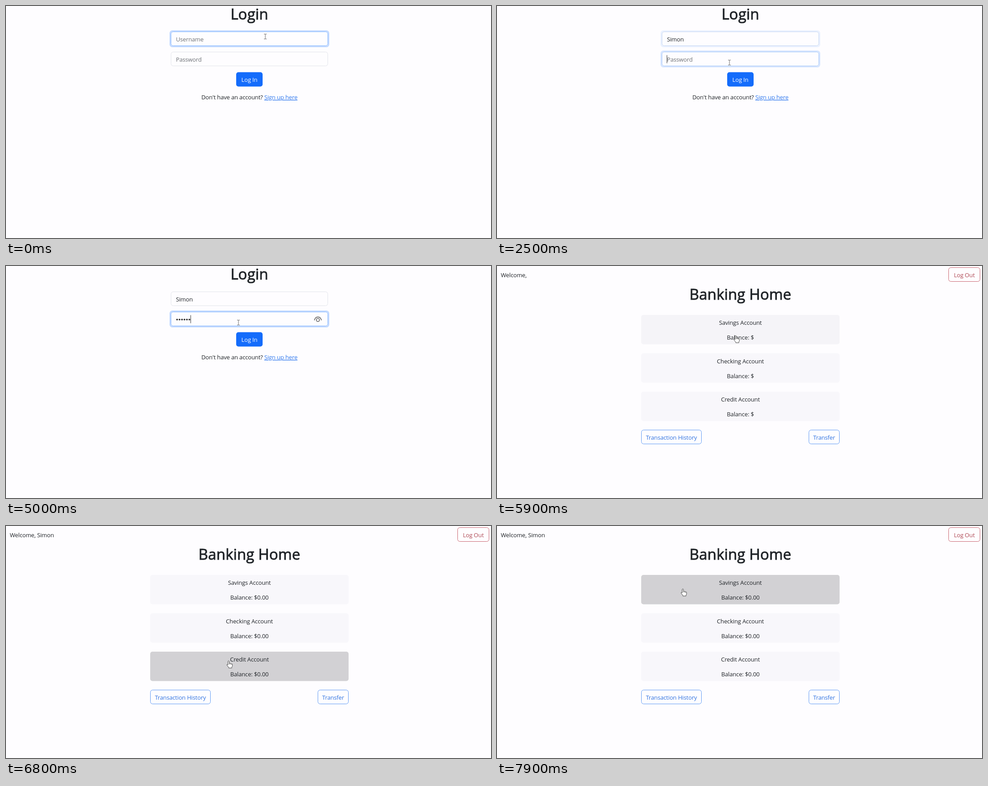
An HTML page for the animation above (8000 ms loop, 1083 by 517 pixels).

```html
<!DOCTYPE html>
<html lang="en">
<head>
<meta charset="utf-8">
<title>Banking login</title>
<style>
  html, body { margin: 0; width: 100%; height: 100%; overflow: hidden; background: #fefdff; }
  svg { display: block; width: 1083px; height: 517px; }
  text { font: 13px "Open Sans", "Noto Sans", sans-serif; letter-spacing: -.15px; fill: #212529; white-space: pre; }
  .title { font-size: 33px; letter-spacing: .1px; stroke: #212529; stroke-width: .9px; }
</style>
</head>
<body>
<svg id="stage" viewBox="0 0 1083 517"></svg>
<script>
const LOOP = 8000, STEP = 100, HOME = 5900, LOADED = 6100;
const USER = "Simon", SECRET = 6;
const stage = document.getElementById("stage");

// Pointer hotspot: time, x, y
const path = [
  [0, 579, 68], [1900, 579, 68], [2300, 519, 126], [5000, 519, 126],
  [5400, 533, 155], [HOME, 533, 155], [6200, 550, 148], [6600, 518, 270],
  [6850, 492, 308], [7000, 490, 308], [7100, 490, 290], [7200, 489.5, 257],
  [7700, 415, 140], [LOOP, 415, 140]
];

const accounts = ["Savings", "Checking", "Credit"];
// Hovered account, from, to
const hovers = [[0, 5890, 6280], [1, 6360, 6560], [2, 6640, 7200], [1, 7250, 7460], [0, 7550, 9000]];

const clamp = v => Math.max(0, Math.min(1, v));
const mix = (a, b, k) => `rgb(${a.map((v, i) => Math.round(v + (b[i] - v) * k))})`;
const fade = (t, from, to) => clamp((t - from) / 150) * (1 - clamp((t - to) / 150));
const typed = (t, start, gap, max) => Math.max(0, Math.min(max, Math.floor((t - start) / gap) + 1));

function pointerAt(t) {
  const i = path.findIndex(p => p[0] > t);
  const [t0, x0, y0] = path[i - 1], [t1, x1, y1] = path[i];
  const k = (t - t0) / (t1 - t0);
  return [x0 + (x1 - x0) * k, y0 + (y1 - y0) * k];
}

const text = (s, x, y, attrs = "") => `<text x="${x}" y="${y}" ${attrs}>${s}</text>`;
const centered = (s, x, y, attrs = "") => text(s, x, y, `text-anchor="middle" ${attrs}`);
const rect = (x, y, w, h, attrs) => `<rect x="${x}" y="${y}" width="${w}" height="${h}" rx="5" ${attrs}/>`;

function outlineButton(label, x, y, w, border, ink) {
  return rect(x, y, w, 31, `fill="none" stroke="${border}"`) +
    centered(label, x + w / 2, y + 21.5, `style="fill:${ink}"`);
}

function field(y, focus) {
  const ring = rect(366.8, y - 1.7, 353.4, 34.4, `fill="none" stroke="#0d6efd" stroke-opacity="${.25 * focus}" stroke-width="3.3"`);
  return ring + rect(368.5, y, 350, 31, `fill="#fefdff" stroke="${mix([226, 228, 234], [134, 183, 254], focus)}"`);
}

function caret(x, y, t, since) {
  return Math.floor((t - since) / 500) % 2 ? "" :
    `<path id="caret" d="M${x} ${y}v18" stroke="#333"/>`;
}

function pointer(kind, x, y) {
  const shapes = {
    beam: `<path d="M-3-5.5h2.2L0-5 .8-5.5H3M0-5V5M-3 5.5h2.2L0 5 .8 5.5H3" fill="none" stroke="#666"/>`,
    arrow: `<path d="M0 0V11.5L2.7 9 4.6 13 6.4 12.2 4.6 8.3H8Z" fill="#fff" stroke="#555"/>`,
    hand: `<path d="M-1.5 1Q0-1 1.3 1V6Q3 4.8 4 6.3 5.7 5.4 6.3 6.9 8.3 6.4 8.3 8.5V11Q8 13 7 14V16H0V14.5L-4 9.5Q-4.3 7.6-2.5 8.2L-1.5 9.2Z" fill="#fff" stroke="#444"/>
      <path d="M1.3 6V8.5M4 6.3V8.5M6.3 7V9" stroke="#444" stroke-width=".7"/>`
  };
  return `<g transform="translate(${x} ${y})" stroke-linejoin="round">${shapes[kind]}</g>`;
}

function login(t, y) {
  const chars = typed(t, 700, 200, USER.length);
  const dots = typed(t, 3350, 250, SECRET);
  const grey = `style="fill:#6c7075"`;
  const onButton = y > 147;
  let out = centered("Login", 543.5, 30, `class="title"`);

  out += field(57.5, fade(t, -600, 2400));
  out += chars ? text(USER.slice(0, chars), 379.5, 79, `id="user"`) : text("Username", 379.5, 79, grey);
  if (t < 2400) out += caret(379.5, 64, t, chars ? 500 + chars * 200 : -600);

  out += field(102.5, fade(t, 2400, 5500));
  if (dots) {
    for (let i = 0; i < dots; i++) out += `<circle cx="${382 + i * 5.5}" cy="119.3" r="1.9" fill="#333"/>`;
    out += `<g fill="none" stroke="#555" stroke-width="1.4"><path d="M688.5 121Q690.5 113.5 696.5 113.5T704.5 121"/><circle cx="696.5" cy="120.3" r="3.4"/></g>`;
  } else out += text("Password", 379.5, 123.5, grey);
  if (t >= 2400 && t < 5500) {
    out += caret(dots ? 379.5 + dots * 5.5 : 379.5, 109.5, t, dots ? 3100 + dots * 250 : 2400);
  }

  out += rect(514, 147.5, 59, 32, `fill="${onButton ? "#0b5ed7" : "#146cfb"}"`);
  out += centered("Log In", 543.5, 169, `style="fill:#fff"`);
  out += centered(`Don't have an account? <tspan fill="#3179ee" text-decoration="underline">Sign up here</tspan>`, 543.5, 208);
  return out;
}

function home(t) {
  const loaded = t >= LOADED;
  let out = text("Welcome, " + (loaded ? USER : ""), 8.5, 25);
  out += outlineButton("Log Out", 1008.5, 3.5, 70, "#c9626f", "#b04a56");
  out += centered("Banking Home", 543.5, 75, `class="title"`);
  accounts.forEach((name, i) => {
    const y = 109 + i * 85.5;
    const level = Math.max(...hovers.map(([n, a, b]) => n === i ? fade(t, a, b) : 0));
    out += rect(322, y, 443, 65.5, `fill="${mix([248, 247, 251], [210, 209, 212], level)}"`);
    out += centered(name + " Account", 543.5, y + 22);
    out += centered("Balance: $" + (loaded ? "0.00" : ""), 543.5, y + 55);
  });
  out += outlineButton("Transaction History", 322.5, 365.5, 134, "#5c98f4", "#2f72e0");
  out += outlineButton("Transfer", 696.5, 365.5, 68, "#5c98f4", "#2f72e0");
  return out;
}

function pointerKind(t, y) {
  if (t >= HOME) return hovers.some(([, a, b]) => t >= a && t < b) ? "hand" : "arrow";
  if (y > 147) return "hand";
  return (y > 89 && y < 102) || y > 134 ? "arrow" : "beam";
}

function draw(now) {
  const t = Math.floor(now % LOOP / STEP) * STEP;
  const [x, y] = pointerAt(t);
  stage.innerHTML = (t < HOME ? login(t, y) : home(t)) + pointer(pointerKind(t, y), x, y);
  const user = document.getElementById("user"), mark = document.getElementById("caret");
  if (user && mark && t < 2400) mark.setAttribute("transform", `translate(${user.getComputedTextLength()} 0)`);
}

const start = performance.now();
function tick() {
  draw(performance.now() - start);
  requestAnimationFrame(tick);
}
tick();
</script>
</body>
</html>
```
